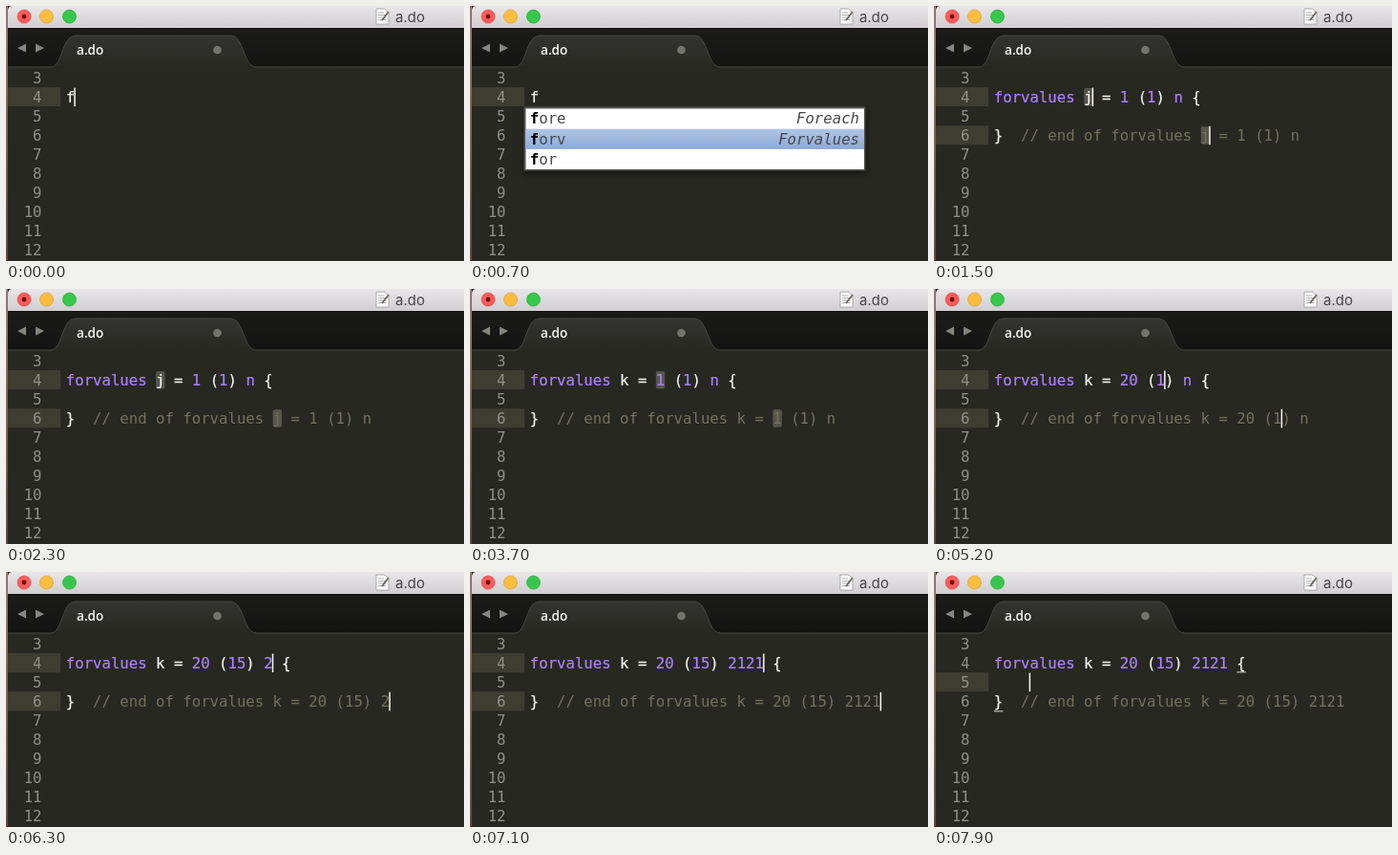
These frames come from a looping animation (480 by 267 pixels, 8000 ms). An HTML page:

```html
<!DOCTYPE html>
<html lang="en">
<head>
<meta charset="utf-8">
<title>Snippet fields</title>
<style>
  html, body { margin: 0; width: 100%; height: 100%; overflow: hidden; background: #272822; }
  svg { display: block; width: 100%; height: 100%; }
  text { white-space: pre; }
  .mono { font: 15.66px "DejaVu Sans Mono", monospace; }
  .code { fill: #f8f8f2; stroke: #f8f8f2; stroke-width: .2; }
  .code .p { fill: #ae81ff; stroke: #ae81ff; }
  .comment { fill: #75715e; }
  .gutter { fill: #8f908a; text-anchor: end; }
  .menu { fill: #484848; }
  .menu .hit { fill: #000; font-weight: bold; }
  .menu .hint { font-style: italic; text-anchor: end; }
  .title { font: 15px Inter, Roboto, sans-serif; fill: #474547; }
  .tab { font: 600 13.6px "Open Sans", "Noto Sans", sans-serif; fill: #f4f4f0; }
</style>
</head>
<body>
<svg viewBox="0 0 480 267" preserveAspectRatio="none">
  <defs>
    <linearGradient id="bar" x2="0" y2="1"><stop stop-color="#e9e6e9"/><stop offset="1" stop-color="#d0cdd0"/></linearGradient>
    <linearGradient id="strip" x2="0" y2="1"><stop stop-color="#1b1c19"/><stop offset="1" stop-color="#141512"/></linearGradient>
    <linearGradient id="tabFill" x2="0" y2="1"><stop stop-color="#343530"/><stop offset="1" stop-color="#272822"/></linearGradient>
    <linearGradient id="pick" x2="0" y2="1"><stop stop-color="#b0c5e7"/><stop offset="1" stop-color="#8ca9d6"/></linearGradient>
    <linearGradient id="desk" x2="0" y2="1"><stop stop-color="#94766a"/><stop offset="1" stop-color="#59443b"/></linearGradient>
    <filter id="shadow" x="-10%" y="-20%" width="120%" height="150%"><feGaussianBlur stdDeviation="3"/></filter>
  </defs>

  <rect width="480" height="267" fill="#272822"/>
  <rect y="23" width="480" height="41" fill="url(#strip)"/>
  <path d="M47 64C60 63 58 31 73 31H235C250 31 248 63 262 64Z" fill="url(#tabFill)"/>
  <path d="M0 64H47C60 63 58 31 73 31H235C250 31 248 63 262 64H480" fill="none" stroke="#474842"/>
  <path d="M21 39.5v9l-9-4.500zM31 39.500v9l9-4.500z" fill="#85867f"/>
  <circle cx="221.500" cy="46" r="4.300" fill="#73746c"/>
  <text class="tab" x="74" y="51">a.do</text>

  <g id="rows"></g>
  <rect width="2" height="267" fill="url(#desk)"/>
  <path d="M2 23.500V5Q2 0 7 0H480V23.500Z" fill="url(#bar)"/>
  <rect x="2" y="23" width="478" height="1" fill="#0c0c0a"/>
  <g stroke-width=".7">
    <circle cx="19" cy="11" r="7" fill="#fc5b57" stroke="#dd4542"/>
    <circle cx="19" cy="11" r="2.400" fill="#6a0c0b"/>
    <circle cx="42.500" cy="11" r="7" fill="#fdbd3e" stroke="#dc9e2f"/>
    <circle cx="66.500" cy="11" r="7" fill="#35c84b" stroke="#28a838"/>
  </g>
  <path d="M388 3h9l4 4v12h-13z" fill="#fafafa" stroke="#9a9a9c" stroke-width=".8"/>
  <path d="M390 7h6M390 9.500h8M390 12h8M390 14.500h8" stroke="#a6a9ae" stroke-width=".9"/>
  <path d="M394 15l7-9" stroke="#6f6a62" stroke-width="2"/>
  <text class="title" x="408" y="16.500">a.do</text>

  <g id="marks"></g>
  <text id="head" class="mono code"></text>
  <text id="foot" class="mono code"></text>
  <g id="carets"></g>

  <g id="popup">
    <rect x="57" y="109" width="358" height="66" fill="#000" opacity=".55" filter="url(#shadow)"/>
    <rect x="56.500" y="105.500" width="358" height="67" fill="#565752"/>
    <rect x="58.500" y="107.500" width="354.500" height="63.500" fill="#fff"/>
    <rect id="choice" x="58.500" width="354.500" height="21.200" fill="url(#pick)"/>
    <g id="items" class="mono menu"></g>
  </g>
</svg>
<script>
const LOOP = 8000, LEFT = 62.8, CELL = 9.43;
const MENU_OPEN = 100, MENU_DOWN = 400, INSERT = 1400;
const FOOT_SHIFT = 13; // extra columns in front of the mirrored fields on line 6

// time, field values, active field, whether it is selected
const STEPS = [
  [INSERT, "j 1 1 n", 0, true],
  [2400, "k 1 1 n", 0, false],
  [2700, "k 1 1 n", 1, true],
  [3800, "k 2 1 n", 1, false],
  [4000, "k 20 1 n", 1, false],
  [4300, "k 20 1 n", 2, true],
  [5200, "k 20 1 n", 2, false],
  [5400, "k 20 15 n", 2, false],
  [5700, "k 20 15 n", 3, true],
  [6300, "k 20 15 2", 3, false],
  [6500, "k 20 15 21", 3, false],
  [7000, "k 20 15 212", 3, false],
  [7100, "k 20 15 2121", 3, false],
  [7900, "k 20 15 2121", 4, false]
];

const $ = id => document.getElementById(id);
const rowY = line => 95.1 + (line - 4) * 20.1;
const colX = col => LEFT + col * CELL;
const rect = (x, y, w, h, fill, extra = "") =>
  `<rect x="${x}" y="${y}" width="${w}" height="${h}" fill="${fill}" ${extra}/>`;
const purple = s => `<tspan class="p">${s}</tspan>`;

let gutter = "";
for (let line = 3; line <= 12; line++) {
  gutter += `<rect id="band${line}" x="2" y="${rowY(line) - 10}" width="55" height="20" fill="#3e3d32"/>` +
    `<text class="mono gutter" x="37.500" y="${rowY(line) + 5.5}">${line}</text>`;
}
$("rows").innerHTML = gutter;

$("items").innerHTML = [["ore", "Foreach"], ["orv", "Forvalues"], ["or", ""]].map(([rest, hint], i) => {
  const y = 123.4 + i * 21.2;
  return `<text x="${LEFT}" y="${y}"><tspan class="hit">f</tspan>${rest}</text>` +
    `<text class="hint" x="408" y="${y}">${hint}</text>`;
}).join("");

for (const [id, line] of [["head", 4], ["foot", 6]]) {
  $(id).setAttribute("x", LEFT);
  $(id).setAttribute("y", rowY(line) + 5.5);
}

function describe(t) {
  const step = STEPS.filter(s => s[0] <= t).pop();
  if (!step) return { key: 0, head: "f", foot: "", lines: [4], marks: "", spots: [[4, 1]] };

  const [key, values, field, selected] = step;
  const [name, from, by, to] = values.split(" ");
  const view = {
    key,
    head: `${purple("forvalues")} ${name} = ${purple(from)} (${purple(by)}) ${purple(to)} {`,
    foot: `}  <tspan class="comment" stroke="none">// end of forvalues ${name} = ${from} (${by}) ${to}</tspan>`,
    marks: ""
  };

  if (field === 4) {
    const brace = `forvalues ${name} = ${from} (${by}) ${to} `.length;
    view.lines = [5];
    view.spots = [[5, 4]];
    view.marks = rect(colX(brace), rowY(4) + 9.3, CELL, 1, "#d8d8d2") +
      rect(colX(0), rowY(6) + 10, CELL, 1, "#d8d8d2");
    return view;
  }

  const starts = [10];
  [name + " = ", from + " (", by + ") "].forEach((s, i) => starts.push(starts[i] + s.length));
  const start = starts[field], end = start + [name, from, by, to][field].length;
  view.lines = [4, 6];
  view.spots = [[4, end], [6, end + FOOT_SHIFT]];
  if (selected) {
    view.marks = view.spots.map(([line, col]) =>
      rect(colX(col - end + start), rowY(line) - 9, (end - start) * CELL, 18.5, "#56554c", 'rx="2"')).join("");
  }
  return view;
}

// Solid after a key press, then a soft blink once per second.
function blink(age) {
  const p = age % 1000;
  if (p >= 700) return 0;
  if (p >= 500) return (700 - p) / 200;
  return age >= 1000 ? Math.min(1, p / 200) : 1;
}

let lastView = "";
function draw(now) {
  const t = now % LOOP, view = describe(t);
  const signature = JSON.stringify(view);
  if (signature !== lastView) {
    lastView = signature;
    $("head").innerHTML = view.head;
    $("foot").innerHTML = view.foot;
    $("marks").innerHTML = view.marks;
    $("carets").innerHTML = view.spots.map(([line, col]) =>
      rect(colX(col) - .9, rowY(line) - 9.5, 1.5, 19.5, "#f8f8f0")).join("");
    for (let line = 3; line <= 12; line++) {
      $("band" + line).setAttribute("opacity", view.lines.includes(line) ? 1 : 0);
    }
  }
  $("carets").setAttribute("opacity", blink(t - view.key));
  $("popup").setAttribute("visibility", t >= MENU_OPEN && t < INSERT ? "visible" : "hidden");
  $("choice").setAttribute("y", t < MENU_DOWN ? 107.5 : 128.7);
}

const begin = performance.now();
function tick() {
  draw(performance.now() - begin);
  requestAnimationFrame(tick);
}
tick();
</script>
</body>
</html>
```
